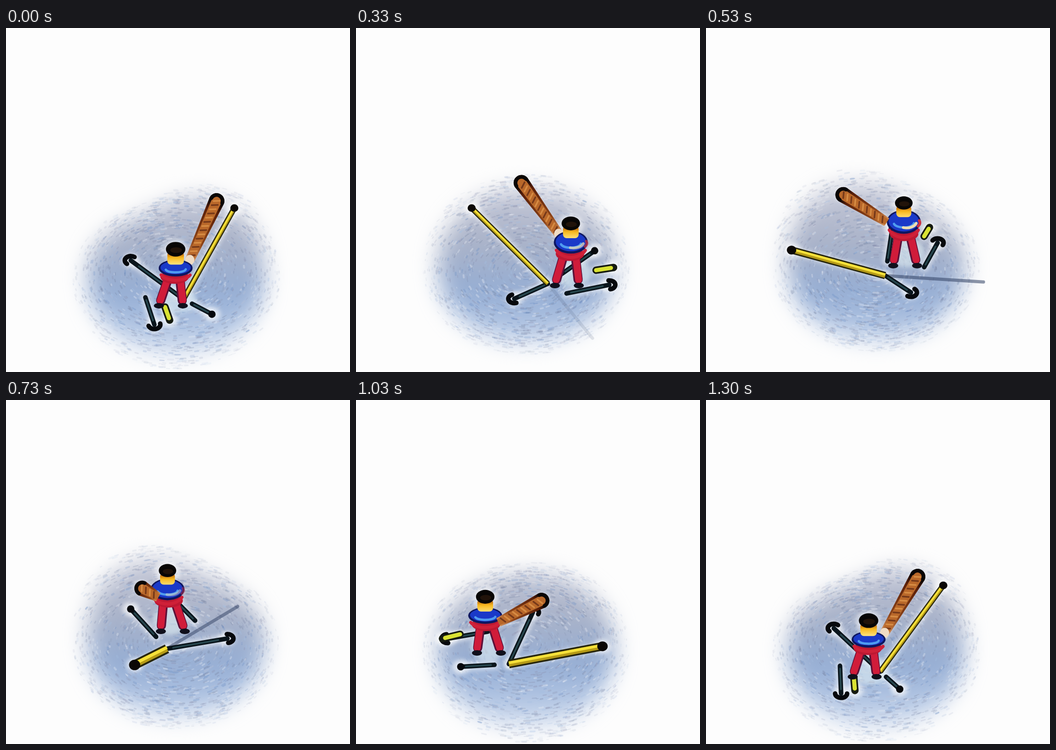
These frames come from a looping animation (748x748 px, 1330 ms). An HTML page with a canvas:

```html
<!DOCTYPE html>
<html lang="en">
<head>
<meta charset="utf-8">
<title>Turning skier</title>
<style>
  html, body { margin: 0; width: 100%; height: 100%; overflow: hidden; background: #fdfdfd; }
  canvas { display: block; width: 748px; height: 748px; }
</style>
</head>
<body>
<canvas id="stage" width="748" height="748"></canvas>
<script>
const ctx = document.getElementById('stage').getContext('2d');
const LOOP = 1330, STEPS = 40, TAU = Math.PI * 2;
const CX = 374, TILT = 0.6, DEPTH = 0.0006;

const rad = deg => deg * Math.PI / 180;
const mix = (a, b, k) => a + (b - a) * k;

// A point circling the upright axis, seen in perspective: x, y, depth, scale.
const orbit = (radius, level, start) => turn => {
  const a = rad(start) + turn, z = radius * Math.sin(a), s = 1 / (1 + z * DEPTH);
  return [CX + radius * Math.cos(a) * s, level - TILT * z * s, z, s];
};

const head = orbit(93, 422, -93);
const feet = orbit(85, 551, -100);
const hub = orbit(45, 563, -75);
const grip = orbit(72, 462, -70);
const batTip = orbit(86, 385, 10);
const poleTip = orbit(187, 465, 45);
const hookTip = orbit(108, 522, 165);
const longTip = orbit(165, 523, -66);
const shortRoot = orbit(105, 535, -130);
const shortTip = orbit(178, 530, -105);
const handRoot = orbit(148, 511, -100);
const handTip = orbit(185, 511, -95);
const trailTip = orbit(228, 545, -147);

// Runs from -1 to 1 as the far side of the scene lifts.
const lift = turn => Math.cos(turn - rad(135));

let seed = 7;
const rand = () => (seed = seed * 16807 % 2147483647) / 2147483647;
const tints = ['#7683a2', '#8f9bb8', '#6c8ec4', '#b9c2d8', '#8c8fae', '#a5c0e2', '#f0f3f8'];
const flecks = Array.from({ length: 1900 }, () => ({
  a: rand() * TAU, r: Math.sqrt(rand()) * 1.02, len: 4 + rand() * 8,
  w: 1.5 + rand() * 3, tint: tints[Math.floor(rand() * tints.length)]
}));

const along = ([a, b], k) => [mix(a[0], b[0], k), mix(a[1], b[1], k)];

function line(a, b, w, color, cap = 'round') {
  ctx.lineCap = cap;
  ctx.lineWidth = w;
  ctx.strokeStyle = color;
  ctx.beginPath();
  ctx.moveTo(a[0], a[1]);
  ctx.lineTo(b[0], b[1]);
  ctx.stroke();
}

function oval(x, y, rx, ry, fill) {
  ctx.fillStyle = fill;
  ctx.beginPath();
  ctx.ellipse(x, y, rx, ry, 0, 0, TAU);
  ctx.fill();
}

function arc(x, y, rx, ry, from, to, w, color) {
  ctx.lineCap = 'round';
  ctx.lineWidth = w;
  ctx.strokeStyle = color;
  ctx.beginPath();
  ctx.ellipse(x, y, rx, ry, 0, from, to);
  ctx.stroke();
}

function drawSnow(turn) {
  const reach = a => {
    const up = -Math.sin(a), skew = -Math.sin(2 * a) * Math.max(0, up);
    return 206 + 14 * Math.cos(2 * a) + 22 * lift(turn) * up + 30 * Math.cos(turn) * skew;
  };
  const fill = ctx.createLinearGradient(0, 330, 0, 730);
  fill.addColorStop(0, '#c8cad8');
  fill.addColorStop(0.35, '#a9b2c8');
  fill.addColorStop(0.62, '#94add4');
  fill.addColorStop(0.82, '#b4c7e4');
  fill.addColorStop(1, '#e2e9f4');
  ctx.filter = 'blur(24px)';
  ctx.fillStyle = fill;
  ctx.beginPath();
  for (let i = 0; i < 64; i++) {
    const a = i / 64 * TAU, r = reach(a) * 0.87;
    ctx.lineTo(370 + r * Math.cos(a), 530 + r * Math.sin(a));
  }
  ctx.fill();
  ctx.filter = 'none';
  for (const f of flecks) {
    const a = f.a - turn, c = Math.cos(a), s = Math.sin(a);
    const r = f.r * reach(a), x = 370 + r * c, y = 530 + r * s;
    ctx.globalAlpha = 0.1 + 0.22 * Math.max(0, 1 - f.r ** 5);
    line([x - s * f.len / 2, y + c * f.len / 4], [x + s * f.len / 2, y - c * f.len / 4], f.w, f.tint);
  }
  ctx.globalAlpha = 1;
}

function drawHalo(rods, [x, y]) {
  ctx.filter = 'blur(5px)';
  ctx.globalAlpha = 0.55;
  for (const [a, b] of rods) {
    line(a, b, 20, '#fff');
    oval(b[0], b[1], 19, 16, '#fff');
  }
  oval(x, y + 4, 28, 26, '#fff');
  oval(x + 6, y + 108, 38, 32, '#e3f3f6');
  ctx.filter = 'none';
  ctx.globalAlpha = 1;
}

function drawTrail(from, turn) {
  ctx.globalAlpha = 0.6 * Math.max(0, Math.cos(turn - rad(167)));
  line(from, trailTip(turn), 7, '#344365');
  ctx.globalAlpha = 1;
}

function darkRod([a, b], w) {
  line(a, b, w, '#0a151c');
  line(along([a, b], 0.1), along([a, b], 0.85), w * 0.35, '#28484f');
}

function hookedRod([a, b]) {
  darkRod([a, b], 10);
  const dir = Math.atan2(b[1] - a[1], b[0] - a[0]);
  arc(b[0], b[1], 13, 9.5, dir - 1.5, dir + 1.6, 10, '#07090d');
}

function drawPole([a, b]) {
  const w = 15 * b[3] ** 3, shift = w * 0.14;
  line(a, b, w, '#26250b', 'butt');
  line(a, b, w * 0.62, '#b59a16', 'butt');
  line([a[0], a[1] - shift], [b[0], b[1] - shift], w * 0.32, '#f6e13a', 'butt');
  oval(b[0], b[1], w * 0.4 + 4, w * 0.36 + 4, '#0b0806');
}

function drawBat([a, b]) {
  const len = Math.hypot(b[0] - a[0], b[1] - a[1]);
  const shape = (near, far, fill) => {
    ctx.fillStyle = fill;
    ctx.beginPath();
    ctx.moveTo(0, -near);
    ctx.lineTo(len, -far);
    ctx.arc(len, 0, far, -Math.PI / 2, Math.PI / 2);
    ctx.lineTo(0, near);
    ctx.fill();
  };
  const skin = ctx.createLinearGradient(0, 0, len + 16, 0);
  skin.addColorStop(0, '#d3905a');
  skin.addColorStop(0.25, '#8e4519');
  skin.addColorStop(0.75, '#5a1f08');
  skin.addColorStop(0.88, '#0c0605');
  ctx.save();
  ctx.translate(a[0], a[1]);
  ctx.rotate(Math.atan2(b[1] - a[1], b[0] - a[0]));
  shape(10, 17, skin);
  shape(7, 11, '#b9682a');
  for (let x = 8; x < len; x += 10) line([x, -6], [x + 6, 6], 3.5, x % 20 < 10 ? '#76391a' : '#d68c44');
  arc(len, 0, 13, 13, -1.5, 1.5, 8, '#0b0706');
  ctx.restore();
}

function drawLeg(hip, foot, side) {
  const shin = along([hip, foot], 0.8);
  line(along([hip, foot], 0.7), foot, 11, '#191229');
  line(hip, shin, 20, '#5d1038');
  line([hip[0] + side, hip[1]], [shin[0] + side, shin[1]], 15, '#d01c3a');
  oval(foot[0], foot[1], 11, 6, '#10101c');
}

function drawBody(turn, [x, y, , size]) {
  const ry = 21.5 + 4.5 * lift(turn), cy = y + 41, hipY = cy + ry + 6;
  const [fx, fy] = feet(turn), lean = (fx - x) * 0.35;
  for (const side of [-1, 1]) drawLeg([x + 13 * side + lean, hipY], [fx + 26 * side, fy], side);
  oval(x + lean * 0.6, hipY - 5, 31, 15, '#bd1832');
  arc(x, cy + 8, 34, ry, 0.4, 2.75, 7, '#cf2038');

  oval(x, cy, 37, ry, '#0d1660');
  oval(x, cy - 1, 33, ry - 4, '#1a39c8');
  arc(x, cy + 2, 22, ry * 0.4, 0.1, 2.9, 5, '#4f9cf0');
  ctx.globalAlpha = Math.max(0, lift(turn));
  arc(x + 6, cy - 1, 22, ry * 0.55, 0.3, 1.9, 6, '#f0dfb4');
  arc(x + 4, cy + 2, 31, ry * 0.6, -0.3, 0.5, 6, '#cf3242');
  ctx.globalAlpha = 1;

  const skin = ctx.createLinearGradient(0, y + 8, 0, y + 34);
  skin.addColorStop(0, '#b35a0c');
  skin.addColorStop(0.4, '#f6b81f');
  skin.addColorStop(1, '#ffe480');
  ctx.fillStyle = skin;
  ctx.beginPath();
  ctx.roundRect(x - 17 * size, y + 5, 34 * size, 27 * size, 8);
  ctx.fill();
  oval(x, y, 20 * size, 15 * size, '#080605');
  oval(x + 1, y + 2, 12 * size, 6 * size, '#21130a');
}

function draw(step) {
  const turn = step * TAU / STEPS, base = hub(turn), top = head(turn);
  const longEnd = longTip(turn);
  const bat = [grip(turn), batTip(turn)];
  const pole = [base, poleTip(turn)];
  const hooked = [base, hookTip(turn)];
  const long = [along([base, longEnd], 0.3), longEnd];
  const short = [shortRoot(turn), shortTip(turn)];
  const hand = [handRoot(turn), handTip(turn)];
  const batInFront = bat[1][2] < bat[0][2] - 10;

  ctx.fillStyle = '#fdfdfd';
  ctx.fillRect(0, 0, 748, 748);
  drawSnow(turn);
  drawHalo([bat, pole, hooked, long, short, hand], top);
  drawTrail(base, turn);
  if (!batInFront) {
    drawBat(bat);
    oval(bat[0][0], bat[0][1], 10, 11, '#f0dcc4');
  }
  darkRod(long, 10);
  oval(longEnd[0], longEnd[1], 8, 8, '#07090d');
  hookedRod(hooked);
  hookedRod(short);
  drawPole(pole);
  line(hand[0], hand[1], 16, '#151a10');
  line(hand[0], along(hand, 0.85), 9, '#d9e233');
  drawBody(turn, top);
  if (batInFront) drawBat(bat);
}

// Steps are a fortieth of the loop, each starting on a whole 10 ms.
const stepAt = t => Math.min(STEPS - 1, Math.floor((Math.floor(t / 10) * 10 + 3.4) * 0.03));

const start = performance.now();
let shown = -1;
function tick() {
  const step = stepAt((performance.now() - start) % LOOP);
  if (step !== shown) draw(shown = step);
  requestAnimationFrame(tick);
}
tick();
</script>
</body>
</html>
```
